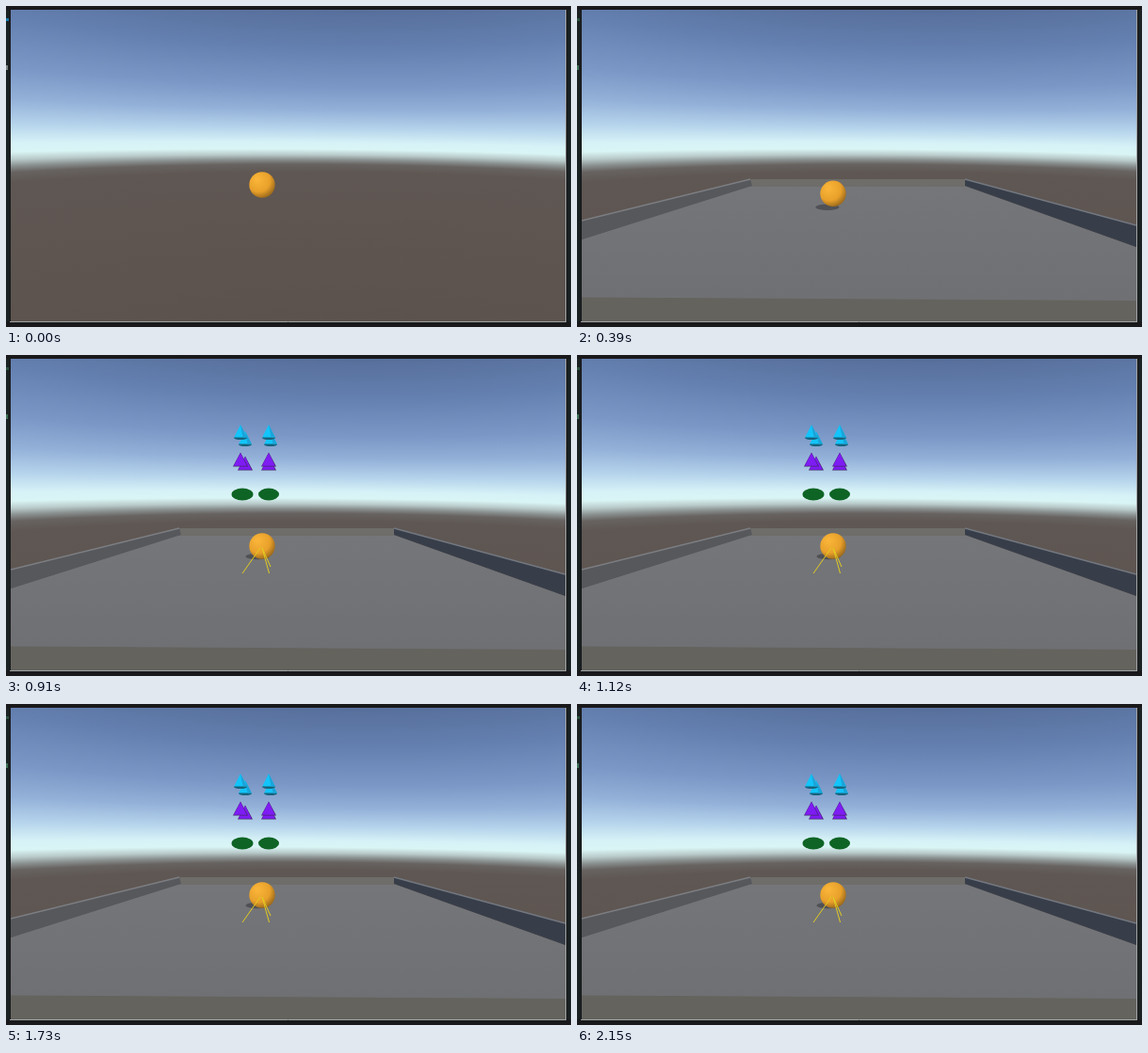
Animation, 600 px wide and 341 px high, one loop 2180 ms. Source, as an HTML page with a canvas:

```html
<!DOCTYPE html>
<html lang="en">
<head>
<meta charset="utf-8">
<style>
html, body { margin: 0; width: 100%; height: 100%; overflow: hidden; background: #19191b; }
canvas { display: block; }
</style>
</head>
<body>
<canvas id="stage" width="600" height="341"></canvas>
<script>
const LOOP = 2180, FLOOR_AT = 30, FALL_AT = 120, LAND_AT = 440;
const ctx = document.getElementById('stage').getContext('2d');

function poly(c, color, ...p) {
  c.beginPath();
  for (let i = 0; i < p.length; i += 2) c.lineTo(p[i], p[i + 1]);
  c.closePath();
  c.fillStyle = color;
  c.fill();
}

function line(c, color, width, x1, y1, x2, y2) {
  c.beginPath();
  c.moveTo(x1, y1);
  c.lineTo(x2, y2);
  c.strokeStyle = color;
  c.lineWidth = width;
  c.stroke();
}

function oval(c, color, x, y, rx, ry) {
  c.beginPath();
  c.ellipse(x, y, rx, ry, 0, 0, 7);
  c.fillStyle = color;
  c.fill();
}

function layer(draw) {
  const cv = document.createElement('canvas');
  cv.width = 600;
  cv.height = 341;
  draw(cv.getContext('2d'));
  return cv;
}

// Heights above the curved horizon, with their colours
const SKY = [
  [162, '#576f9b'], [120, '#6480b0'], [80, '#7a97c6'], [55, '#94b1d9'],
  [35, '#b7d5ec'], [21, '#d7f2f7'], [14, '#daf5f5'], [8, '#b9caca'],
  [3, '#8a9190'], [-2, '#676361'], [-10, '#5f5753'], [-170, '#5c524d']
];

const world = layer(c => {
  c.fillStyle = '#19191b';
  c.fillRect(0, 0, 600, 341);
  c.fillStyle = '#1a2122';
  c.fillRect(0, 4, 4, 331);
  c.fillRect(596, 4, 4, 331);
  for (let x = 5; x < 594; x++) {
    const horizon = 166 + 8 * ((x - 300) / 295) ** 2;
    const scale = 1 + 0.25 * ((x - 360) / 295) ** 2;
    const g = c.createLinearGradient(0, horizon - 162 * scale, 0, horizon + 170 * scale);
    for (const [h, color] of SKY) g.addColorStop((162 - h) / 332, color);
    c.fillStyle = g;
    c.fillRect(x, 4, 1, 331);
  }
});

const arena = layer(c => {
  c.beginPath();
  c.rect(5, 4, 589, 331);
  c.clip();
  const g = c.createLinearGradient(0, 190, 0, 312);
  g.addColorStop(0, '#757679');
  g.addColorStop(1, '#6f7073');
  poly(c, g, 184, 191, 412, 191, 594, 256, 594, 314, 5, 310, 5, 248);
  poly(c, '#6e6d6a', 182, 184, 413, 184, 414, 192, 183, 192);
  poly(c, '#56585c', 184, 184, 186, 191, 5, 248, 5, 228);
  poly(c, '#383e49', 412, 184, 594, 233, 594, 256, 412, 191);
  line(c, '#7c7e82', 1.3, 184, 184, 5, 228);
  line(c, '#737881', 1.3, 412, 184, 594, 233);
  poly(c, '#64635e', 5, 309.5, 594, 313, 594, 335, 5, 335);
});

const spawned = layer(c => {
  const cone = (x, y) => {
    oval(c, '#17627c', x, y + 13, 7, 2);
    poly(c, '#12c4fa', x, y - 1, x + 6.8, y + 12.5, x - 6.8, y + 12.5);
    poly(c, '#1aa4d8', x, y - 1, x + 6.8, y + 12.5, x + 2.5, y + 12.5);
  };
  const pyramid = (x, y) => {
    poly(c, '#46256d', x, y - .5, x + 8, y + 14.5, x - 8, y + 14.5);
    poly(c, '#7e1cf4', x, y, x + 6.8, y + 13.8, x - 7.2, y + 13.8);
  };
  cone(254, 82);
  cone(281, 82);
  cone(249, 75);
  cone(279, 75);
  pyramid(254, 108);
  pyramid(249, 104);
  pyramid(279, 108);
  pyramid(279, 104);
  oval(c, '#0e6424', 251, 148, 11.5, 6.5);
  oval(c, '#0e6424', 279, 148, 11, 6.5);
});

function ball(y) {
  const g = ctx.createRadialGradient(267, y - 6, 2, 269, y - 4, 19);
  g.addColorStop(0, '#f8b338');
  g.addColorStop(.6, '#e8a02a');
  g.addColorStop(1, '#95651b');
  oval(ctx, g, 272, y, 13.7, 13.7);
}

function render(t) {
  const fall = Math.min(1, Math.max(0, (t - FALL_AT) / (LAND_AT - FALL_AT))) ** 2;
  const landed = t >= LAND_AT;
  ctx.drawImage(world, 0, 0);
  if (t >= FLOOR_AT) {
    ctx.drawImage(arena, 0, 0);
    oval(ctx, '#505156', 263 + 4 * fall, 213 + fall, 12.5, 3.3);
  }
  if (landed) ctx.drawImage(spawned, 0, 0);
  ball(190 + 13 * fall);
  if (landed) {
    line(ctx, '#e2cb22', 1, 270, 205, 251, 232);
    line(ctx, '#e2cb22', 1, 272, 205, 279.5, 232);
    line(ctx, '#e2cb22', 1, 272, 205, 281, 225);
  }
  // Pale right and bottom edges of the view
  line(ctx, '#a0a4a4', 1, 594.5, 4, 594.5, 336);
  line(ctx, '#a0a4a4', 1, 4, 335.5, 595, 335.5);
  // Slivers of the panel beside the view
  ctx.fillStyle = t < FLOOR_AT ? '#1878a8' : '#28503c';
  ctx.fillRect(0, 13, 3, 3);
  ctx.fillStyle = t < FLOOR_AT ? '#7c8484' : '#3c6e54';
  ctx.fillRect(0, 63, 2, 5);
}

const start = performance.now();
function tick() {
  render((performance.now() - start) % LOOP);
  requestAnimationFrame(tick);
}
tick();
</script>
</body>
</html>
```
